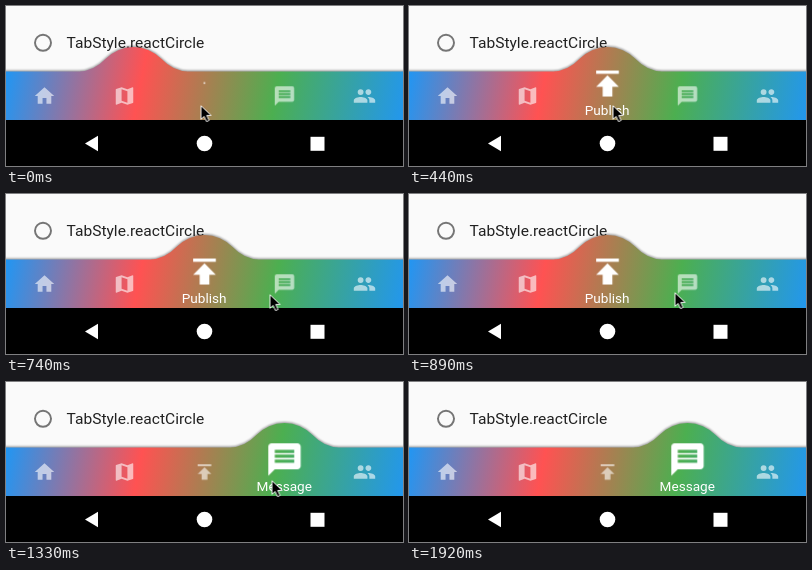
Animation, 397 px wide and 160 px high, one loop 2530 ms. Source, as an HTML page:

```html
<!DOCTYPE html>
<html lang="en">
<head>
<meta charset="utf-8">
<title>Convex tab bar</title>
<style>
  html, body { margin: 0; width: 100%; height: 100%; overflow: hidden; background: #fafafa; }
  svg { display: block; width: 397px; height: 160px; }
  text { font-family: Roboto, Arial, sans-serif; }
  .title { font-size: 15.55px; fill: #212121; }
  .label { font-size: 13.6px; fill: #fff; text-anchor: middle; }
  .shadow { filter: drop-shadow(0 -.5px 1.3px rgba(0, 0, 0, .42)); }
  .idle { opacity: .6; }

  .bump, .publish, .message, .label, .cursor {
    animation: 2530ms step-end infinite;
  }
  .bump { animation-name: bump; }
  .publish { animation-name: publish; }
  .message { animation-name: message; }
  .publish-label { animation-name: publish-label; }
  .message-label { animation-name: message-label; }
  .cursor { animation-name: cursor; }

  @keyframes bump {
    0% { transform: translate(127.5px, 65.4px); }
    5.929% { transform: translate(198.5px, 65.4px); }
    46.64% { transform: translate(233.7px, 65.4px); }
    52.569%, 100% { transform: translate(278.5px, 65.4px); }
  }
  @keyframes publish {
    0% { transform: translate(198.5px, 77px) scale(.16); opacity: 1; }
    5.929% { transform: translate(198.5px, 77.5px) scale(1.62); opacity: 1; }
    46.64%, 100% { transform: translate(198.5px, 90px) scale(.972); opacity: .6; }
  }
  @keyframes message {
    0% { transform: translate(278.5px, 90px) scale(.972); opacity: .6; }
    46.64% { transform: translate(278.5px, 77.5px) scale(.75); opacity: 1; }
    52.569%, 100% { transform: translate(278.5px, 77.5px) scale(1.62); opacity: 1; }
  }
  @keyframes publish-label {
    0% { opacity: 0; }
    5.929% { opacity: 1; }
    46.64%, 100% { opacity: 0; }
  }
  @keyframes message-label {
    0% { opacity: 0; }
    52.569%, 100% { opacity: 1; }
  }
  @keyframes cursor {
    0% { transform: translate(194.5px, 99px); opacity: 1; }
    17.391% { transform: translate(203.5px, 99px); opacity: 1; }
    23.32% { transform: translate(241.5px, 100px); opacity: 1; }
    29.249% { transform: translate(263.5px, 100px); opacity: 1; }
    35.178% { transform: translate(265.5px, 98px); opacity: 1; }
    64.427% { transform: translate(295.5px, 108px); opacity: 1; }
    69.96% { transform: translate(350px, 141px); opacity: 1; }
    75.889%, 100% { transform: translate(350px, 141px); opacity: 0; }
  }
</style>
</head>
<body>
<svg viewBox="0 0 397 160">
  <defs>
    <linearGradient id="rainbow" gradientUnits="userSpaceOnUse" x1="0" y1="65" x2="397" y2="140">
      <stop offset="0" stop-color="#2196f3"/>
      <stop offset=".3333" stop-color="#ff5252"/>
      <stop offset=".6667" stop-color="#4caf50"/>
      <stop offset="1" stop-color="#2196f3"/>
    </linearGradient>
    <clipPath id="convex">
      <path class="bump" d="M-500 0H-54.4Q-39.9 0-28.1-12.3A38.9 38.9 0 0 1 28.1-12.3Q39.9 0 54.4 0H500V60H-500Z"/>
    </clipPath>
  </defs>

  <rect width="397" height="160" fill="#fafafa"/>
  <circle cx="37" cy="36.8" r="8" fill="none" stroke="#757575" stroke-width="1.95"/>
  <text class="title" x="60.6" y="42">TabStyle.reactCircle</text>

  <g class="shadow">
    <rect x="-10" y="30" width="417" height="95" fill="url(#rainbow)" clip-path="url(#convex)"/>
  </g>
  <rect y="114" width="397" height="46"/>

  <g fill="#fff">
    <!-- tab icons on a 24-unit grid -->
    <g class="idle" transform="translate(38.5 90) scale(.972) translate(-12 -12)">
      <path d="M10 20v-6h4v6h5v-8h3L12 3 2 12h3v8z"/>
    </g>
    <g class="idle" transform="translate(118.5 90) scale(.972) translate(-12 -12)">
      <path d="M20.5 3l-.16.03L15 5.1 9 3 3.36 4.9c-.21.07-.36.25-.36.48V20.5c0 .28.22.5.5.5l.16-.03L9 18.9l6 2.1 5.64-1.9c.21-.07.36-.25.36-.48V3.5c0-.28-.22-.5-.5-.5zM15 19l-6-2.11V5l6 2.11V19z" fill-rule="evenodd"/>
    </g>
    <g class="publish">
      <path transform="translate(-12 -12)" d="M5 4v2h14V4zM5 14h4v6h6v-6h4l-7-7z"/>
    </g>
    <g class="message">
      <path transform="translate(-12 -12)" fill-rule="evenodd" d="M20 2H4c-1.1 0-2 .9-2 2V22l4-4h14c1.1 0 2-.9 2-2V4c0-1.1-.9-2-2-2zM18 14H6v-2h12zM18 11H6V9h12zM18 8H6V6h12z"/>
    </g>
    <g class="idle" transform="translate(358.5 90) scale(.972) translate(-12 -12)">
      <circle cx="8" cy="8" r="3"/>
      <path d="M16 11c1.66 0 2.99-1.34 2.99-3S17.66 5 16 5c-1.66 0-3 1.34-3 3s1.34 3 3 3zM8 13c-2.33 0-7 1.17-7 3.5V19h14v-2.5c0-2.33-4.67-3.5-7-3.5zm8 0c-.29 0-.62.02-.97.05 1.16.84 1.97 1.97 1.97 3.45V19h6v-2.5c0-2.33-4.67-3.5-7-3.5z"/>
    </g>

    <!-- system navigation -->
    <path d="M79 137.5L92 129.7V145.3Z"/>
    <circle cx="198.5" cy="137.5" r="7.8"/>
    <rect x="304.5" y="130.8" width="14" height="14"/>
  </g>

  <text class="label publish-label" x="198.2" y="109">Publish</text>
  <text class="label message-label" x="278.3" y="109">Message</text>

  <g class="cursor">
    <path d="M.5 .8V14.3L3.6 11.4L6 16.6L8.6 15.5L6.3 10.4H10.7Z" stroke="#fff" stroke-width=".9"/>
  </g>
</svg>
</body>
</html>
```
